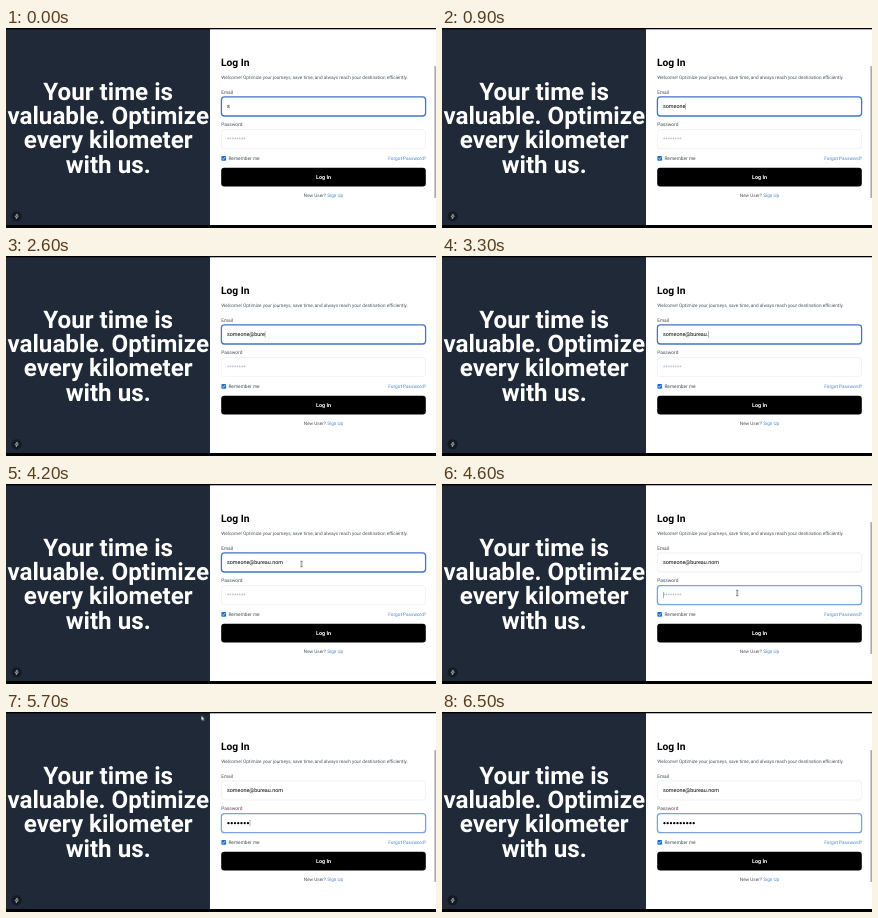
Animation of 430x200 px, one loop 6.6 s. Source, as an HTML page:

```html
<!DOCTYPE html>
<html lang="en">
<head>
<meta charset="utf-8">
<title>Log In</title>
<style>
  html, body { margin: 0; width: 100%; height: 100%; overflow: hidden; background: #000; }
  svg { display: block; width: 100vw; height: 100vh; }
  text { font-family: Roboto, Arial, sans-serif; font-size: 4.7px; fill: #4b5563; text-rendering: geometricPrecision; white-space: pre; }
  .hero { font-size: 24.2px; font-weight: 700; fill: #fff; text-anchor: middle; }
  .title { font-size: 10.25px; font-weight: 700; fill: #000; }
  .label { font-size: 4.8px; fill: #414a58; }
  .input { font-size: 5.4px; fill: #000; }
  .hint { font-size: 5.4px; fill: #a9b0bb; }
  .button { font-size: 5.4px; font-weight: 700; fill: #fff; text-anchor: middle; }
  .link { fill: #4a82cd; }
  .end { text-anchor: end; }
  .mid { text-anchor: middle; }
  .box { fill: #fff; stroke: #e5e7eb; stroke-width: .6; }
  .ring { fill: none; stroke: #4675c8; stroke-width: 1.3; }
  .ring.pass { stroke: #7ca2da; }

  .bar, .ring, .beam, .arrow { animation: 6600ms step-end infinite; }
  .bar { animation-name: bar; animation-timing-function: linear; }
  .ring.email { animation-name: leave; }
  .ring.pass { animation-name: enter; }
  .beam { animation-name: beam; }
  .arrow { animation-name: arrow; }

  @keyframes bar {
    0%, 20.5% { opacity: 1; }
    24.2%, 65.1% { opacity: 0; }
    66.6%, 100% { opacity: 1; }
  }
  @keyframes leave { 0% { opacity: 1; } 68.1%, 100% { opacity: 0; } }
  @keyframes enter { 0% { opacity: 0; } 68.1%, 100% { opacity: 1; } }
  @keyframes beam {
    0% { opacity: 0; transform: translate(295.5px, 80px); }
    63.6% { opacity: 1; transform: translate(295.5px, 80px); }
    65.1% { opacity: 1; transform: translate(295.3px, 94px); }
    66.6% { opacity: 1; transform: translate(295.2px, 109px); }
    72.7%, 100% { opacity: 0; transform: translate(295.2px, 109px); }
  }
  @keyframes arrow {
    0% { opacity: 0; transform: translate(295px, 109px); }
    83.3% { opacity: 1; transform: translate(272px, 80px); }
    84.8% { opacity: 1; transform: translate(225px, 32px); }
    86.3% { opacity: 1; transform: translate(195.3px, 3.6px); }
    87.8%, 100% { opacity: 0; transform: translate(195.3px, 3.6px); }
  }
</style>
</head>
<body>
<svg viewBox="0 0 430 200" preserveAspectRatio="none">
  <rect width="430" height="200"/>
  <rect y="1.3" width="204" height="195.7" fill="#1f2937"/>
  <rect x="204" y="1.3" width="226" height="195.7" fill="#fff"/>

  <text class="hero" x="102.2" y="71.7">Your time is</text>
  <text class="hero" x="102.2" y="96">valuable. Optimize</text>
  <text class="hero" x="102.2" y="120.3">every kilometer</text>
  <text class="hero" x="102.2" y="144.6">with us.</text>

  <circle cx="10.6" cy="188.3" r="5.1" fill="#141a23"/>
  <path d="M11.2 185.9L9 188.8H10.6L10.2 190.8L12.3 187.9H10.8Z" fill="none" stroke="#d5d8dc" stroke-width=".6"/>

  <text class="title" x="215" y="38.2">Log In</text>
  <text x="215.2" y="50.7">Welcome! Optimize your journeys, save time, and always reach your destination efficiently.</text>

  <text class="label" x="215.2" y="65.7">Email</text>
  <rect class="box" x="215.4" y="68.9" width="204.2" height="19.1" rx="3"/>
  <rect class="ring email" x="215.4" y="68.9" width="204.2" height="19.1" rx="3"/>
  <text class="input" id="email" x="221" y="80.3"></text>

  <text class="label" x="215.2" y="98.4">Password</text>
  <rect class="box" x="215.4" y="101.6" width="204.2" height="19.1" rx="3"/>
  <rect class="ring pass" x="215.4" y="101.6" width="204.2" height="19.1" rx="3"/>
  <text class="hint" id="hint" x="221" y="113">********</text>
  <g id="dots"></g>
  <rect id="caret" width=".5" height="6.2" fill="#666"/>

  <rect x="215.4" y="128" width="4.7" height="4.7" rx=".8" fill="#1f6fc9"/>
  <path d="M216.5 130.4L217.4 131.4L219.1 129.2" fill="none" stroke="#fff" stroke-width=".7"/>
  <text class="label" x="222.4" y="132.1">Remember me</text>
  <text class="link end" x="420" y="132.1">Forgot Password?</text>

  <rect x="215.2" y="139.7" width="204.6" height="18.7" rx="3"/>
  <text class="button" x="317.5" y="151">Log In</text>
  <text class="mid" x="317.5" y="168.9">New User? <tspan class="link">Sign Up</tspan></text>

  <rect class="bar" x="428.5" y="38" width="1.3" height="132" rx=".6" fill="#959595"/>

  <path class="beam" d="M-1.1 -2.9Q0 -2.9 0 -2.2Q0 -2.9 1.1 -2.9M0 -2.2V2.2M-1.1 2.9Q0 2.9 0 2.2Q0 2.9 1.1 2.9" fill="none" stroke="#111" stroke-width=".6"/>
  <path class="arrow" d="M0 0V4.8L1.2 3.8L2 5.4L2.8 5L2.1 3.5H3.4Z" fill="#fff" stroke="#111" stroke-width=".25"/>
</svg>
<script>
  const LOOP = 6600;
  const ADDRESS = "someone@bureau.nom";
  // Time of each key press, in ms
  const EMAIL_KEYS = [0, 100, 400, 500, 600, 700, 800, 1400, 1800, 1900, 2000, 2500, 2800, 2900, 3300, 3500, 3500, 3600];
  const PASS_KEYS = [4800, 4900, 5000, 5200, 5400, 5500, 5700, 5900, 6000, 6200];
  const LEFT = 221, DOT_STEP = 3.25;

  const byId = id => document.getElementById(id);
  const email = byId("email"), hint = byId("hint"), caret = byId("caret");
  const pressed = (keys, t) => keys.filter(k => k <= t).length;
  const show = (el, on) => el.setAttribute("visibility", on ? "visible" : "hidden");

  const dots = PASS_KEYS.map((_, i) => {
    const dot = document.createElementNS("http://www.w3.org/2000/svg", "circle");
    dot.setAttribute("cx", LEFT + DOT_STEP * (i + 0.45));
    dot.setAttribute("cy", 111.2);
    dot.setAttribute("r", 1.15);
    byId("dots").append(dot);
    return dot;
  });

  function render(t) {
    const typed = ADDRESS.slice(0, pressed(EMAIL_KEYS, t));
    if (email.textContent !== typed) email.textContent = typed;

    const count = pressed(PASS_KEYS, t);
    dots.forEach((dot, i) => show(dot, i < count));
    show(hint, count === 0);

    const inPass = t >= 4500;
    const width = inPass ? count * DOT_STEP : email.getComputedTextLength();
    caret.setAttribute("x", LEFT + width);
    caret.setAttribute("y", inPass ? 108 : 75.4);
    show(caret, (t >= 100 && t < 3600) || (inPass && t < 6400));
  }

  const start = performance.now();
  function tick() {
    render((performance.now() - start) % LOOP);
    requestAnimationFrame(tick);
  }
  tick();
</script>
</body>
</html>
```
